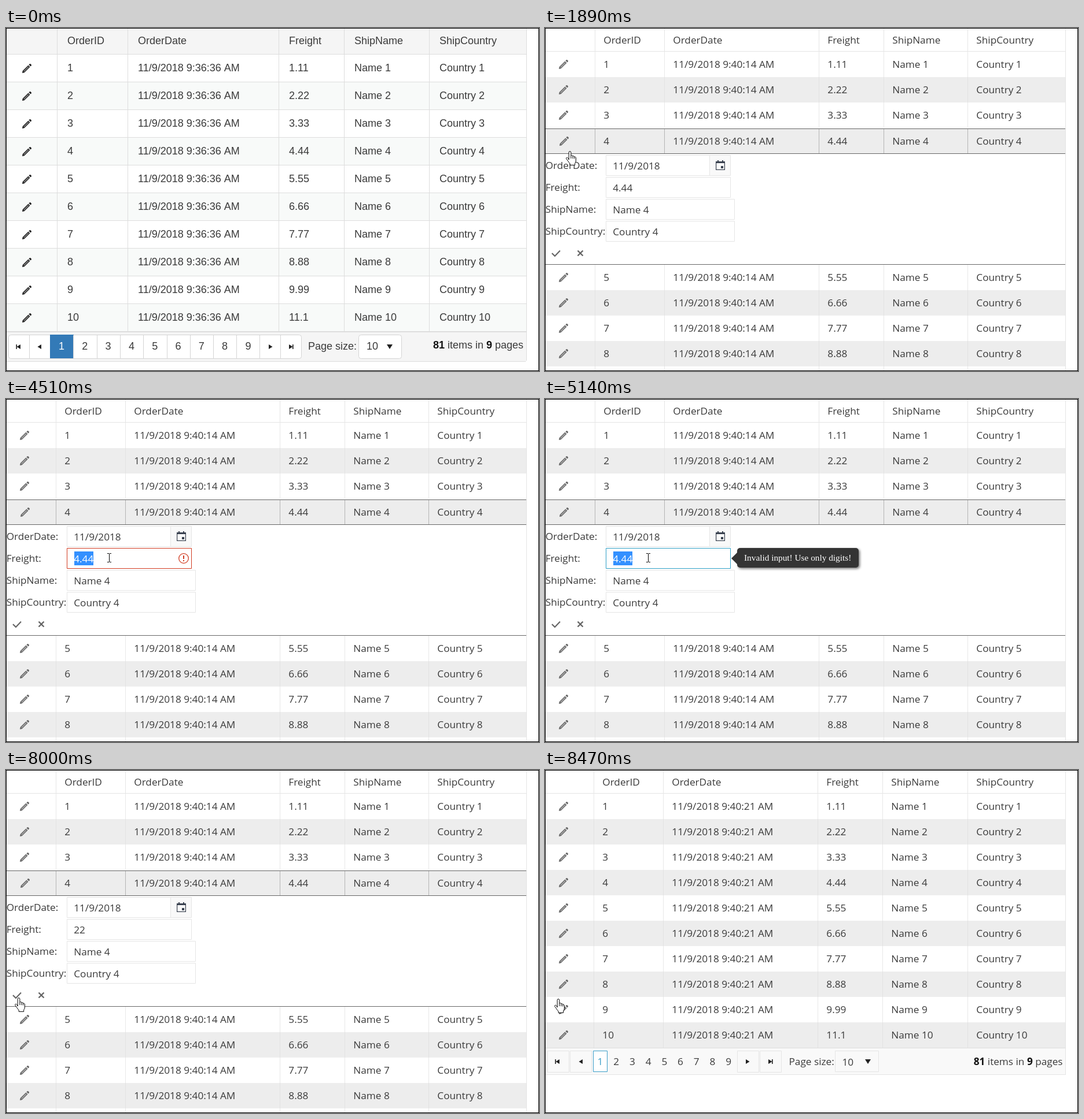
Recreate the animation shown at these times as an HTML page with a canvas. Size 921 by 594 pixels, loop 8550 ms.

```html
<!DOCTYPE html>
<html lang="en">
<head>
<meta charset="utf-8">
<title>Grid editing</title>
<style>
  html, body { margin: 0; width: 100%; height: 100%; overflow: hidden; background: #fff; }
  canvas { display: block; }
</style>
</head>
<body>
<canvas id="stage" width="921" height="594"></canvas>
<script>
const ctx = document.getElementById('stage').getContext('2d');
const LOOP = 8550;
const INK = '#3a3a3a';
const ARIAL = '18px "Liberation Sans", Arial, sans-serif';
const ARIAL_BOLD = 'bold ' + ARIAL;
const SANS = '17.2px "Open Sans", "Segoe UI", sans-serif';
const SANS_BOLD = 'bold ' + SANS;
const SERIF = '15.3px "Liberation Serif", Times, serif';
const HEADS = ['OrderID', 'OrderDate', 'Freight', 'ShipName', 'ShipCountry'];
const VALUE_X = 117.2;
const FIELDS = {
  date: [105, 220, 216, 36],
  freight: [105, 258, 216, 36],
  name: [105, 296, 223, 36],
  country: [105, 334, 223, 36]
};

const HAND = new Path2D('M5.2 15V2.6Q5.2.6 7 .6T8.9 2.6V8.4Q9.2 7.3 10.6 7.5T12 9.3Q12.5 8.4 13.6 8.7T14.8 10.4Q15.4 9.7 16.4 10.2T17.4 12V17Q17.3 19.5 15.7 21.4V24.4H7.2V22Q5 19.5 3.6 17.2L.9 13.4Q.2 12 1.5 11.3T4 12.6Z');
const HAND_LINES = new Path2D('M8.9 8.4V13M12 9.3V13.2M14.8 10.4V13.5');
const ARROW = new Path2D('M.5.6V16.6L4.2 13.1L6.7 18.5L9.1 17.5L6.6 12.1H11.6Z');
const PENCIL = new Path2D('M-8 8L-7.3 4.3L2.5 -5.5L5.5 -2.5L-4.3 7.3ZM3.4 -6.4L4.8 -7.8Q5.7 -8.4 6.5 -7.7L7.7 -6.5Q8.4 -5.7 7.8 -4.8L6.4 -3.4Z');

const clamp = p => Math.max(0, Math.min(1, p));
const swing = p => 0.5 - Math.cos(Math.PI * clamp(p)) / 2;

function rect(x, y, w, h, fill) {
  ctx.fillStyle = fill;
  ctx.fillRect(x, y, w, h);
}

function frame(x, y, w, h, fill, stroke, r = 0) {
  ctx.beginPath();
  ctx.roundRect(x + 0.5, y + 0.5, w - 1, h - 1, r);
  ctx.fillStyle = fill;
  ctx.fill();
  ctx.lineWidth = 1;
  ctx.strokeStyle = stroke;
  ctx.stroke();
}

function text(s, x, y, font, fill = INK, align = 'left') {
  ctx.font = font;
  ctx.fillStyle = fill;
  ctx.textAlign = align;
  ctx.fillText(s, x, y);
}

function poly(points, fill) {
  ctx.beginPath();
  points.forEach(([x, y]) => ctx.lineTo(x, y));
  ctx.fillStyle = fill;
  ctx.fill();
}

function stroke(points, color, width) {
  ctx.beginPath();
  points.forEach(([x, y]) => ctx.lineTo(x, y));
  ctx.strokeStyle = color;
  ctx.lineWidth = width;
  ctx.stroke();
}

function placed(x, y, draw) {
  ctx.save();
  ctx.translate(x, y);
  draw();
  ctx.restore();
}

function pencil(x, y, color) {
  placed(x, y, () => {
    ctx.fillStyle = color;
    ctx.fill(PENCIL);
    stroke([[-5.2, 5.2], [3, -3]], 'rgba(255,255,255,.5)', 1.4);
  });
}

// Triangle pointing left (-1) or right (1), with an end bar if asked
function pageArrow(x, y, dir, bar) {
  placed(x, y, () => {
    ctx.scale(dir, 1);
    poly([[-3, -4], [3.5, 0], [-3, 4]], '#222');
    if (bar) rect(3, -4, 1.6, 8, '#222');
  });
}

function downArrow(x, y) {
  poly([[x - 5, y - 4], [x + 5, y - 4], [x, y + 4]], '#222');
}

function summary(right, y, font, bold) {
  let x = right;
  for (const [s, f] of [[' pages', font], ['9', bold], [' items in ', font], ['81', bold]]) {
    text(s, x, y, f, f === bold ? '#111' : INK, 'right');
    x -= ctx.measureText(s).width;
  }
}

function cells(id, stamp) {
  return [id, stamp, id === 10 ? '11.1' : (id * 1.11).toFixed(2), 'Name ' + id, 'Country ' + id];
}

function rowText(values, cols, pad, y, font) {
  values.forEach((s, i) => text(s, cols[i] + pad, y, font));
}

function firstGrid() {
  const cols = [88, 210, 471, 584, 731];
  rect(1, 1, 898, 44, '#f5f5f5');
  rowText(HEADS, cols, 18, 28, ARIAL);
  for (let i = 0; i < 10; i++) {
    const y = 45 + i * 48;
    rect(1, y, 898, 48, i % 2 ? '#f8faf9' : '#fff');
    rect(1, y, 898, 1, '#ddd');
    rowText(cells(i + 1, '11/9/2018 9:36:36 AM'), cols, 18, y + 30, ARIAL);
    pencil(36, y + 25, '#222');
  }
  cols.forEach(x => rect(x, 1, 1, 525, '#ddd'));
  rect(1, 525, 898, 53, '#f5f5f5');
  rect(1, 525, 898, 2, '#ddd');
  rect(1, 577, 897, 1, '#ddd');
  rect(899, 1, 1, 575, '#ddd');

  frame(4, 531, 507, 42, '#fff', '#d4d4d4', 4);
  for (const x of [40, 438, 474]) rect(x, 532, 1, 40, '#d4d4d4');
  for (let i = 0; i < 9; i++) {
    const x = Math.round(76 + i * 40.3);
    if (i) rect(x, 532, 1, 40, '#d4d4d4');
    else rect(76, 531, 41, 41, '#337ab7');
    text(i + 1, 96 + i * 40.3, 557, ARIAL, i ? INK : '#fff', 'center');
  }
  pageArrow(22, 552, -1, true);
  pageArrow(58, 552, -1);
  pageArrow(457, 552, 1);
  pageArrow(492, 552, 1, true);
  text('Page size:', 522, 557, ARIAL);
  frame(609, 531, 75, 42, '#fff', '#d4d4d4', 4);
  text('10', 623, 557, ARIAL);
  downArrow(663, 552);
  summary(894, 555, ARIAL, ARIAL_BOLD);
}

function gridRow(id, y, h, cols, stamp) {
  const even = id % 2 === 0;
  rect(1, y, 898, h, even ? '#ededed' : '#fff');
  cols.forEach(x => rect(x, y, 1, h, even ? '#e2e2e2' : '#e8e8e8'));
  rowText(cells(id, stamp), cols, 15.3, y + 28, SANS);
  pencil(32, y + 22, '#666');
}

function gridHead(cols) {
  rowText(HEADS, cols, 15.3, 27, SANS);
  cols.forEach(x => rect(x, 1, 1, 40, '#e5e5e5'));
  rect(1, 40, 898, 1, '#e5e5e5');
}

function viewGrid(stamp) {
  const cols = [84, 204, 471, 583, 730];
  gridHead(cols);
  for (let id = 1; id <= 10; id++) gridRow(id, 41 + (id - 1) * 44, 44, cols, stamp);
  rect(1, 481, 898, 46, '#f9f9f9');
  rect(1, 481, 898, 1, '#dedede');
  rect(1, 527, 899, 1, '#e5e5e5');
  rect(899, 1, 1, 527, '#e5e5e5');

  for (const x of [4, 43, 332, 371]) frame(x, 486, 38, 38, '#f9f9f9', '#e5e5e5');
  pageArrow(22, 505, -1, true);
  pageArrow(62, 505, -1);
  pageArrow(350, 505, 1);
  pageArrow(389, 505, 1, true);
  frame(83, 486, 25, 37, '#fff', '#3a9dc8');
  for (let i = 0; i < 9; i++) {
    text(i + 1, 95.5 + i * 27.7, 511, SANS, i ? INK : '#3a9dc8', 'center');
  }
  text('Page size:', 421.5, 511, SANS);
  frame(501, 486, 76, 37, '#f9f9f9', '#e5e5e5');
  text('10', 513.5, 512, SANS);
  downArrow(558, 505);
  summary(894.5, 511, SANS, SANS_BOLD);
}

function calendar() {
  rect(284, 221, 1, 34, '#e5e5e5');
  rect(285, 221, 35, 34, '#f9f9f9');
  ctx.strokeStyle = '#3a4250';
  ctx.lineWidth = 1.2;
  ctx.strokeRect(295.6, 231.6, 14.8, 13.8);
  rect(295, 231, 16, 3, '#3a4250');
  rect(298, 229, 2, 3, '#3a4250');
  rect(306, 229, 2, 3, '#3a4250');
  rect(304, 239, 4, 4, '#3a4250');
}

function freightField(t, hover) {
  const [x, y, w, h] = FIELDS.freight;
  const focused = t >= 3270 && t < 8000;
  const invalid = t >= 4510 && t < 4590;
  const value = t < 6450 ? '4.44' : t < 7070 ? '2' : '22';
  const border = invalid ? '#d13b21' : focused ? '#2f9fc6' : hover ? '#bdbdbd' : '#e5e5e5';
  frame(x, y, w, h, '#fff', border);
  const selected = focused && t < 6450;
  if (selected) rect(118, 264, 33, 24, '#3390ff');
  text(value, VALUE_X, 283, SANS, selected ? '#fff' : INK);
  if (focused && !selected && t < 7850) {
    rect(Math.floor(VALUE_X + ctx.measureText(value).width), 264, 1, 24, '#000');
  }
  if (invalid) {
    ctx.beginPath();
    ctx.arc(307, 276, 8.3, 0, Math.PI * 2);
    ctx.strokeStyle = '#d13b21';
    ctx.lineWidth = 1.3;
    ctx.stroke();
    rect(306, 271, 2, 6, '#d13b21');
    rect(306, 279, 2, 2, '#d13b21');
  }
}

function editGrid(t, mouse) {
  const cols = [86, 206, 473, 585, 730];
  const stamp = '11/9/2018 9:40:14 AM';
  gridHead(cols);
  for (let id = 1; id < 4; id++) gridRow(id, 41 + (id - 1) * 44, 44, cols, stamp);
  for (let id = 5; id < 10; id++) gridRow(id, 410 + (id - 5) * 44, 44, cols, stamp);
  rect(1, 174, 898, 44, '#ededed');
  cols.forEach(x => rect(x, 174, 1, 43, '#b5b5b5'));
  rowText(cells(4, stamp), cols, 15.3, 202, SANS);
  pencil(33, 196, '#666');
  for (const y of [174, 217, 409]) rect(1, y, 898, 1, '#666');
  rect(899, 1, 1, 592, '#e5e5e5');

  ['OrderDate:', 'Freight:', 'ShipName:', 'ShipCountry:'].forEach((s, i) =>
    text(s, 0.7, 244 + i * 38, SANS));
  const values = { date: '11/9/2018', name: 'Name 4', country: 'Country 4' };
  for (const key in values) {
    const [x, y, w, h] = FIELDS[key];
    frame(x, y, w, h, '#fff', mouse.over === key ? '#bdbdbd' : '#e5e5e5');
    text(values[key], VALUE_X, y + 25, SANS);
  }
  calendar();
  freightField(t, mouse.over === 'freight');
  stroke([[12, 390], [17, 395], [26, 385.5]], '#666', 2.2);
  stroke([[56.5, 385.5], [65.5, 394.5]], '#666', 2.4);
  stroke([[65.5, 385.5], [56.5, 394.5]], '#666', 2.4);
}

function tooltip(t) {
  if (t < 4590 || t >= 6760) return;
  const hiding = t >= 6450;
  const start = hiding ? 6450 : 4590;
  const tick = start + Math.floor((t - start) / 78 + 0.05) * 78;
  const alpha = hiding ? 1 - swing((tick - 6300) / 500) : swing((tick - 4550) / 500);
  ctx.save();
  ctx.globalAlpha = alpha;
  ctx.shadowColor = 'rgba(0,0,0,.55)';
  ctx.shadowBlur = 4;
  ctx.shadowOffsetX = ctx.shadowOffsetY = 2;
  ctx.beginPath();
  ctx.roundRect(332, 258, 210, 34, 5);
  ctx.fillStyle = '#343434';
  ctx.fill();
  ctx.shadowColor = 'transparent';
  if (!hiding) poly([[322, 276], [332, 266], [332, 286]], '#343434');
  ctx.globalAlpha = hiding ? 1 : alpha;
  text('Invalid input! Use only digits!', 344, 280, SERIF, '#fff');
  ctx.restore();
}

// Pointer travel in n held steps, the first one taken at the start time
function travel(t, start, end, n, [x0, y0], [x1, y1]) {
  const k = Math.floor((t - start) / (end - start) * (n - 1) + 0.01) + 1;
  const p = swing(k / n);
  return { x: Math.round(x0 + (x1 - x0) * p), y: Math.round(y0 + (y1 - y0) * p), done: p >= 1 };
}

function pointer(t) {
  if (t < 350) return { kind: 'none' };
  let m;
  if (t < 730) m = { kind: 'arrow', x: 252, y: 461 };
  else if (t < 2350) {
    m = travel(t, 730, 1420, 10, [252, 461], [42, 213]);
    m.kind = m.done ? 'hand' : 'arrow';
  } else if (t < 6070) m = travel(t, 2350, 3200, 12, [42, 213], [178, 275]);
  else if (t < 7070) m = travel(t, 6070, 6150, 2, [178, 275], [182, 276]);
  else if (t < 8320) {
    m = travel(t, 7070, 7680, 9, [182, 276], [21, 394]);
    if (m.done) m.kind = 'hand';
  } else m = { kind: 'hand', x: t < 8470 ? 21 : 22, y: t < 8470 ? 395 : 396 };

  if (t >= 1890 && t < 8240) {
    m.over = Object.keys(FIELDS).find(key => {
      const [x, y, w, h] = FIELDS[key];
      return m.x >= x && m.x < x + w && m.y >= y && m.y < y + h;
    });
  }
  m.kind = m.kind || (m.over ? 'beam' : 'arrow');
  return m;
}

function drawPointer({ kind, x, y }) {
  if (kind === 'none') return;
  placed(kind === 'hand' ? x - 6 : x, y, () => {
    if (kind === 'beam') {
      rect(0, -7, 1, 14, '#000');
      for (const top of [-8, 7]) {
        rect(-3, top, 3, 1, '#000');
        rect(1, top, 3, 1, '#000');
      }
      return;
    }
    const shape = kind === 'hand' ? HAND : ARROW;
    ctx.fillStyle = '#fff';
    ctx.strokeStyle = '#000';
    ctx.lineWidth = 1;
    ctx.fill(shape);
    ctx.stroke(shape);
    if (kind === 'hand') ctx.stroke(HAND_LINES);
  });
}

function draw(t) {
  const mouse = pointer(t);
  rect(0, 0, 921, 594, '#fff');
  if (t < 1740) firstGrid();
  else if (t < 1890) viewGrid('11/9/2018 9:40:11 AM');
  else if (t < 8240) {
    editGrid(t, mouse);
    tooltip(t);
  } else viewGrid('11/9/2018 9:40:21 AM');
  drawPointer(mouse);
  ctx.strokeStyle = '#000';
  ctx.lineWidth = 1;
  ctx.strokeRect(0.5, 0.5, 920, 593);
}

const begin = performance.now();
function tick() {
  draw((performance.now() - begin) % LOOP);
  requestAnimationFrame(tick);
}
tick();
</script>
</body>
</html>
```
